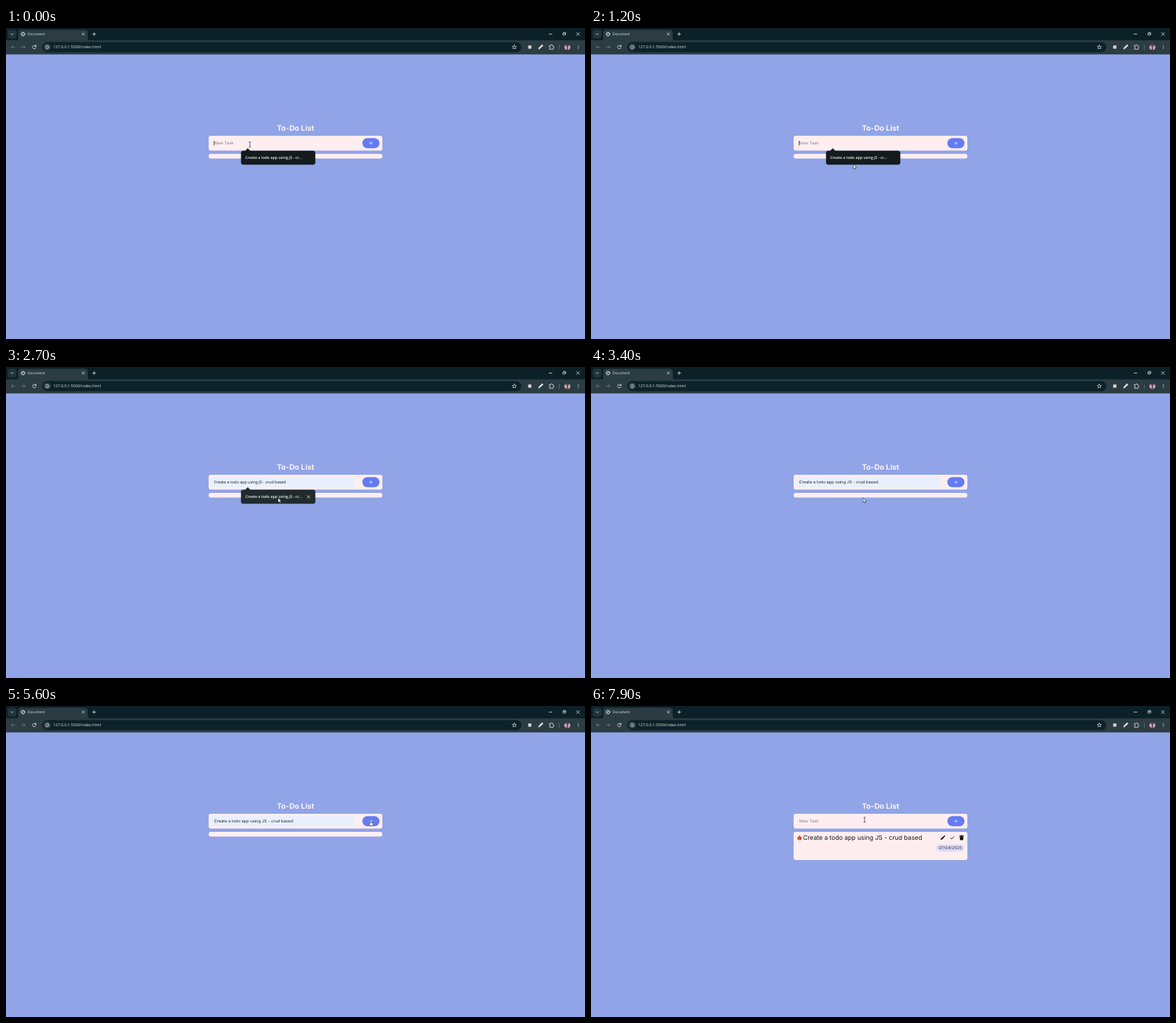
Recreate the animation shown at these times as an HTML page. Size 800 by 430 pixels, loop 8000 ms.

```html
<!DOCTYPE html>
<html lang="en">
<head>
<meta charset="utf-8">
<title>To-Do List</title>
<style>
  html, body { margin: 0; width: 100%; height: 100%; overflow: hidden; background: #90a4e7; }
  svg { display: block; width: 800px; height: 430px; }
  text { white-space: pre; text-rendering: geometricPrecision; }
  .ui { font-family: "Open Sans", "Noto Sans", sans-serif; }
  .app { font-family: Inter, "Open Sans", sans-serif; }
  .line { fill: none; stroke: #dfe6e8; stroke-width: .8; stroke-linecap: round; stroke-linejoin: round; }
  .dim { stroke: #718086; }
  .pink { fill: #feeef0; }
  .hide { display: none; }
</style>
</head>
<body>
<svg viewBox="0 0 800 430">
  <rect width="800" height="430" fill="#90a4e7"/>

  <!-- Browser bars -->
  <rect width="800" height="18" fill="#0c2127"/>
  <rect y="17" width="800" height="19.5" fill="#2b3c42"/>
  <rect x="2.5" y="2.5" width="12" height="12" rx="3.5" fill="#21343a"/>
  <path class="line" d="M7 7.8l1.6 1.6 1.6-1.6"/>
  <path d="M14 17.2q3 0 3-3V6q0-3.5 3.5-3.5h89q3.5 0 3.5 3.5v8.2q0 3 3 3z" fill="#2b3c42"/>
  <g class="line">
    <circle cx="23.5" cy="8.5" r="2.5"/>
    <path d="M21.2 8q1.8-.2 2 1.2t1.3 1.5M23 6.2q.2 1.4 2.7 1.4"/>
    <path d="M105.2 6.8l3.2 3.2m0-3.2l-3.2 3.2M119.7 8.4h4.2m-2.1-2.1v4.2"/>
    <path d="M750.3 8.4h4"/>
    <rect x="769.5" y="7.2" width="2.8" height="2.8" rx=".6"/>
    <path d="M770.6 6.2h2q.8 0 .8.8v2"/>
    <path d="M788.3 6.4l4 4m0-4l-4 4"/>
    <path class="dim" d="M12.2 26.4H7.2l2.2-2.2m-2.2 2.2l2.2 2.2M21.3 26.4h5l-2.2-2.2m2.2 2.2l-2.2 2.2"/>
    <path d="M41.2 25.2a2.4 2.4 0 1 0 .2 1.8M41.5 23.7v1.8h-1.8"/>
  </g>
  <text class="ui" x="30" y="10.4" font-size="4.85" fill="#e7edef">Document</text>
  <rect x="50" y="19.5" width="662" height="14" rx="7" fill="#0d2228"/>
  <circle cx="57" cy="26.4" r="5" fill="#2b3c42"/>
  <g class="line">
    <circle cx="57" cy="26.4" r="2.4" stroke-width=".7"/>
    <path d="M57 26.3v1.2M57 25.1v.1" stroke-width=".7"/>
    <path stroke-width=".7" d="M702.4 23.6l.8 1.8 2 .2-1.5 1.3.5 2-1.8-1.1-1.8 1.1.5-2-1.5-1.3 2-.2z"/>
    <path d="M736 28.8l.5-1.6 2.8-2.8 1.2 1.2-2.8 2.8zM739.4 24.3l1-1q.8-.2 1.2.4t0 1.1l-1 1" fill="#dfe6e8"/>
    <path d="M751 24.4h1.5q0-1.2 1-1.2t1 1.2h1.5v1.5q1.1 0 1.1 1t-1.1 1v1.5H751v-1.6q1 0 1-1t-1-1z"/>
    <path class="dim" d="M764.5 23.5v6" stroke-width=".6"/>
  </g>
  <text class="ui" x="65.2" y="28.4" font-size="5.45" fill="#dde5e7">127.0.0.1:5500/index.html</text>
  <rect x="721.5" y="24.2" width="4.4" height="4.4" fill="#ddd4d0"/>
  <circle cx="775.7" cy="26.4" r="4.4" fill="#4d4350"/>
  <path d="M771.6 28v-2.5q1.6-3 3.2 0v4.8q-2-.2-3.2-2.3zM776.5 30.4v-4.9q1.6-3 3.2 0V28q-1 2-3.2 2.4z" fill="#d3a5b4"/>
  <g fill="#dfe6e8">
    <circle cx="790.8" cy="24.3" r=".6"/><circle cx="790.8" cy="26.4" r=".6"/><circle cx="790.8" cy="28.5" r=".6"/>
  </g>

  <!-- Task form -->
  <text class="app" x="400" y="142.3" font-size="10.3" font-weight="700" fill="#fdf3f5" text-anchor="middle">To-Do List</text>
  <rect class="pink" x="280" y="149" width="240" height="20.6" rx="3"/>
  <rect id="fill" x="284" y="152.3" width="198" height="14" fill="#e8f0fe"/>
  <text id="hint" class="app" x="287.6" y="161.3" font-size="5.8" fill="#858085">New Task</text>
  <text id="preview" class="ui" x="287.4" y="161.3" font-size="5.46" font-weight="500" fill="#14171a">Create a todo app using JS - crud based</text>
  <text id="value" class="app" x="287.6" y="161.3" font-size="5.69" fill="#24272c">Create a todo app using JS - crud based</text>
  <rect id="caret" x="287.3" y="156" width=".7" height="6.6" fill="#222"/>
  <rect x="492.4" y="152.2" width="23.6" height="14" rx="7" fill="#657bf3"/>
  <path d="M501.9 159.2h4.6m-2.3-2.3v4.6" fill="none" stroke="#e9ecff" stroke-width=".7"/>

  <!-- Task list -->
  <rect id="list" class="pink" x="280" y="174" width="240" height="6.6" rx="3"/>
  <g id="task">
    <path d="M287.5 178.2q.3 1.2 1.8 2 2 1.3 1.7 3-.4 2.2-2.9 2.2-2.8 0-3-2.4-.1-1.2.8-2.2l.5.9q1.5-1.2 1.1-3.5z" fill="#e23a1c"/>
    <path d="M287.8 185q-1.2-.2-1.2-1.3 0-.8 1-1.6 1.3.9 1.3 1.7 0 1-1.1 1.2z" fill="#f2652c"/>
    <text class="app" x="293" y="185.1" font-size="8.58" fill="#16161a">Create a todo app using JS - crud based</text>
    <path d="M483.2 185.1v-1.4l3.7-3.7 1.4 1.4-3.7 3.7zM487.3 179.6l.7-.7q.3-.2.6 0l.8.8q.2.3 0 .6l-.7.7z" fill="#111"/>
    <path d="M496.6 182.3l1.7 1.7 3.6-3.7" fill="none" stroke="#111" stroke-width=".9"/>
    <path d="M509 179.3h1.6l.5-.7h1.9l.5.7h1.6v.9H509zM509.5 180.6h5.1l-.3 4q-.1.8-.8.8h-2.9q-.7 0-.8-.8z" fill="#111"/>
    <rect x="477" y="191.4" width="39" height="10" rx="5" fill="#dedbf8"/>
    <text class="app" x="496.6" y="198.4" font-size="5.7" fill="#33333f" text-anchor="middle">07/04/2025</text>
  </g>

  <!-- Autofill suggestion -->
  <g id="popup">
    <rect x="325" y="171" width="102.5" height="18.6" rx="3" fill="#26304c" opacity=".3"/>
    <path id="bubble" d="M327.5 170H330.5L334 166.6 337.5 170H424.5q2.5 0 2.5 2.5V186q0 2.5-2.5 2.5H327.5q-2.5 0-2.5-2.5V172.5q0-2.5 2.5-2.5z" stroke="#111a1c" stroke-width=".6"/>
    <text class="ui" x="330.5" y="181.2" font-size="5.2" font-weight="600" fill="#eef1f2">Create a todo app using JS - cr...</text>
    <path id="dismiss" class="line" d="M416.3 177.8l3.4 3.4m0-3.4l-3.4 3.4"/>
  </g>

  <g id="cursor">
    <path id="arrow" d="M0 0V6.3L1.5 5 2.5 7.2 3.6 6.7 2.6 4.6H4.5z" fill="#fff" stroke="#15181c" stroke-width=".55"/>
    <path id="beam" d="M-1.4-3.4H1.4M0-3.4V3.4M-1.4 3.4H1.4" fill="none" stroke="#29292c" stroke-width=".7"/>
    <path id="hand" d="M-.7.2Q0-.8.6.2V2.3l2.3.5q.7.3.6 1L3 6.5H-.3L-2 4.1q.1-.9 1.3-.1z" fill="#fff" stroke="#15181c" stroke-width=".5"/>
  </g>
</svg>
<script>
const LOOP = 8000, STEP = 100;
const PREVIEW = 1600, PICK = 2900, ADD = 5900;
// time, x, y of the pointer
const path = [
  [0, 337, 161], [200, 337, 161], [800, 362.4, 188.3], [1300, 362.4, 188.3],
  [1900, 376, 181], [3700, 376, 181], [4600, 503.6, 159], [5900, 503.6, 159],
  [6500, 455.6, 190.4], [7300, 455.6, 190.4], [7800, 378, 157.3], [LOOP, 378, 157.3]
];
const el = id => document.getElementById(id);
const show = (id, on) => el(id).classList.toggle("hide", !on);
const ease = p => p * p * (3 - 2 * p);

function pointer(t) {
  const i = path.findIndex(k => k[0] > t);
  const [t0, x0, y0] = path[i - 1], [t1, x1, y1] = path[i];
  const p = ease((t - t0) / (t1 - t0));
  return [x0 + (x1 - x0) * p, y0 + (y1 - y0) * p];
}

function shape(x, y, added) {
  const within = (l, t, r, b) => x > l && x < r && y > t && y < b;
  if (within(492, 152, 516, 166)) return "hand";
  const overTitle = added && within(293, 177, 459, 187);
  return within(284, 152, 482, 167) || overTitle ? "beam" : "arrow";
}

function draw(t) {
  const hover = t >= PREVIEW && t < PICK;
  const added = t >= ADD;
  const filled = t >= PREVIEW && !added;
  show("fill", filled);
  show("hint", !filled);
  show("preview", hover);
  show("value", filled && !hover);
  show("caret", t < PREVIEW && t % 1000 < 500);
  show("popup", t < PICK);
  show("dismiss", hover);
  el("bubble").setAttribute("fill", hover ? "#212b2e" : "#131b1d");
  el("list").setAttribute("height", added ? 39 : 6.6);
  show("task", added);

  const [x, y] = pointer(t);
  const kind = shape(x, y, added);
  for (const id of ["arrow", "beam", "hand"]) show(id, id === kind);
  el("cursor").setAttribute("transform", `translate(${x} ${y})`);
}

function tick() {
  const t = performance.now() % LOOP;
  draw(Math.floor(t / STEP) * STEP);
  requestAnimationFrame(tick);
}
tick();
</script>
</body>
</html>
```
